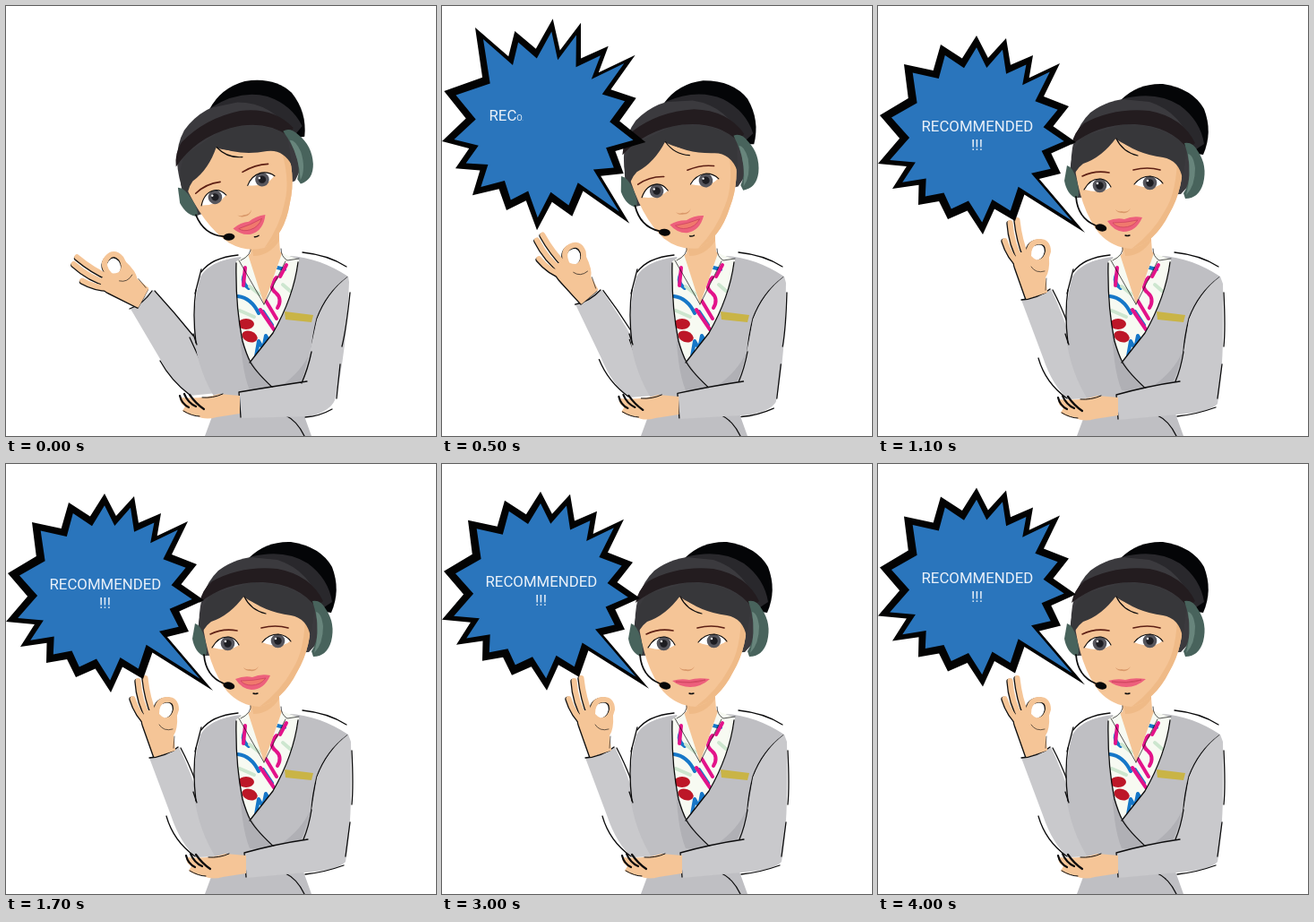
These frames come from a looping animation (480x480 px, 4.1 s). An HTML page:

```html
<!DOCTYPE html>
<html lang="en">
<head>
<meta charset="utf-8">
<title>Recommended</title>
<style>
html, body { margin: 0; width: 100%; height: 100%; overflow: hidden; background: #fff; }
svg { display: block; width: 100vw; height: 100vh; }
text { font-family: Roboto, "Open Sans", sans-serif; font-weight: 400; fill: #eaf1f9; }
.line { fill: none; stroke: #0c0c0d; stroke-width: 1.3; stroke-linecap: round; stroke-linejoin: round; }
.cloth { fill: #bfbfc3; }
.sleeve { fill: #c9c9cc; }
.skin { fill: #f5c597; }
.shade { fill: #b0b0b5; }
.paint { fill: none; stroke-width: 4; stroke-linecap: round; stroke-linejoin: round; }
.brow { fill: none; stroke: #5d1f14; stroke-width: 1.6; stroke-linecap: round; }
</style>
</head>
<body>
<svg viewBox="0 0 480 480">
  <defs>
    <clipPath id="vee"><path d="M259 284L270 278 288 333 308 277 327 283Q322 325 298 365L272 398Q258 360 257 320Z"/></clipPath>
    <g id="fingers" fill="none" stroke-linecap="round" stroke-linejoin="round">
      <path stroke-width="6" d="M160 291Q147 280 141.500 262M161 286Q149 266 147.500 242M166 281Q158 262 155.500 239"/>
      <path stroke-width="6" d="M168 279Q168 264 179 263Q190 262 190 274Q188 284 180 286"/>
      <path stroke-width="2" d="M166 326L154 292Q150 281 159 276L168 276Q172 285 182 285L190 280Q191 296 186 303L188 319Z"/>
    </g>
  </defs>

  <path class="skin" d="M272 250L304 248 306 274 315 284 288 337 263 285 273 276Z"/>
  <path fill="#efba87" d="M274 268Q292 272 305 252L305 262Q294 279 276 279Z"/>

  <path id="sleeve" class="sleeve"/>
  <path id="sleeveLine" class="line"/>
  <path id="cuff" class="line"/>
  <g id="hand">
    <use href="#fingers" x="-1.200" y=".7" stroke="#111"/>
    <g stroke="#f5c597" fill="#f5c597"><use href="#fingers"/></g>
    <path class="skin" d="M166 326L154 292Q150 281 159 276L168 276Q172 285 182 285L190 280Q191 296 186 303L188 319Z"/>
    <path class="line" style="stroke-width:.6" d="M171 291Q176 299 186 296M188 304L187 317"/>
  </g>

  <path class="cloth" d="M262 280Q228 284 217 302Q209 330 210 370Q215 410 236 442L222 480 341 480 332 455Q346 420 346 380L382 302Q350 281 317 279L288 334Z"/>
  <path class="shade" d="M261 352Q266 380 274 396Q284 414 302 432L272 429Q262 405 261 352Z"/>
  <path class="shade" d="M340 386Q335 407 329 420L306 425Q330 408 340 386Z"/>

  <path fill="#f7faf2" d="M257 285L270 277 288 333 308 276 327 283Q322 325 298 365L272 398Q258 360 257 320Z"/>
  <g clip-path="url(#vee)">
    <path class="paint" stroke="#1677c8" d="M259 324Q274 326 282 343M266 300Q262 309 271 315M279 391L282 374 287 383 290 368 295 376M287 341L297 356M303 292L311 294"/>
    <path class="paint" stroke="#e3138a" d="M267 292L265 312M284 339L299 361M290 329L302 349M302 303Q292 313 301 320Q309 327 303 337M313 289L306 302"/>
    <path class="paint" stroke="#cde6cf" d="M261 340L277 347M272 313L283 322M309 311L317 318"/>
    <g fill="#bd1728"><ellipse cx="268" cy="355" rx="9" ry="6"/><ellipse cx="272" cy="369" rx="9" ry="6" transform="rotate(20 272 369)"/></g>
  </g>
  <path class="line" d="M273 268Q275 278 262 284M307 271Q307 280 314 284L327 282M260 284L288 333M312 285L288 333" style="stroke-width:.7"/>
  <path class="line" d="M257 287Q256 335 264 374Q268 388 273 398Q280 410 302 430M326 286Q321 325 298 365L272 398M312 457Q325 463 333 480"/>
  <path class="line" d="M259 278Q229 281 218 297M212 317Q208 343 212 376M331 275Q360 278 380 291M381 303Q357 321 347 349Q342 370 341 386"/>
  <path class="line" d="M218 294L211 321M209 366L213 378"/>
  <path fill="#c9b446" d="M311 341L343 345 341 353 312 350Z"/>
  <path id="arm" class="sleeve"/>
  <path id="armLine" class="line"/>
  <g id="palm">
    <path class="skin" d="M268 437L245 435Q226 441 202 439Q200 445 207 449L204 454Q211 459 219 459Q229 465 242 461L268 457Z"/>
    <path class="line" style="stroke-width:2.2" d="M201 437Q203 446 211 450M206 435Q210 445 219 449M212 436Q219 446 228 452"/>
    <path class="line" style="stroke-width:1" d="M226 439Q238 440 249 435M205 454Q215 460 223 460"/>
  </g>

  <g id="head">
    <path fill="#040507" d="M271 105Q290 86 318 87Q351 92 364 115Q374 141 363 166L336 162Z"/>
    <path fill="#3b3a3e" d="M216 190Q212 143 237 119Q265 98 303 105Q343 115 356 152L352 195 338 210 222 214Z"/>
    <path fill="#29282c" d="M272 104Q310 94 337 111Q360 128 364 154L352 162Q341 119 303 107Z"/>
    <path class="skin" d="M219 174Q236 162 265 148Q288 165 340 167Q342 203 325 232Q309 264 283 271Q262 270 247 254Q225 226 219 174Z"/>
    <path fill="#efba87" d="M340 167Q342 203 325 232Q309 264 283 271Q307 253 320 229Q334 207 334 166Z"/>
    <path fill="#37373a" d="M216 199Q210 166 230 145L275 132Q320 132 345 158L340 193Q336 172 318 169Q287 165 266 147Q250 169 229 176Q218 184 216 199Z"/>
    <path fill="#231c1f" d="M216 155Q219 140 230 131Q263 113 303 117Q340 124 354 153L346 160Q326 134 287 132Q246 131 216 155Z"/>
    <path class="line" style="stroke-width:1.2" d="M266 148Q273 163 290 167"/>
    <g fill="#48635c">
      <path d="M342 153Q351 151 357 162Q368 178 363 198Q358 215 343 215L341 209Q354 190 342 153Z"/>
      <path d="M211 178Q218 180 222 195Q226 210 222 215Q211 211 208 195Z"/>
    </g>
    <path fill="#68857c" d="M346 165Q352 166 354 181Q354 201 344 211Q350 189 346 165Z"/>
    <path class="line" style="stroke-width:1.8" d="M221 213Q223 237 243 245"/>
    <ellipse cx="249" cy="247.500" rx="6.500" ry="4" fill="#080809" transform="rotate(14 249 247)"/>
    <path class="brow" d="M228 190Q242 183 258 186M285 183Q301 179 315 183"/>
    <g id="open">
      <path fill="#fff" d="M231 205Q237 192 249 193Q256 194 260 202Q249 210 231 205ZM286 199Q293 190 304 190Q313 191 317 198Q306 207 286 199Z"/>
      <g fill="#56565d"><circle cx="247.500" cy="200.500" r="7.800"/><circle cx="303.500" cy="197.500" r="7.800"/></g>
      <g fill="#1d1d22"><circle cx="247.500" cy="200.500" r="4.200"/><circle cx="303.500" cy="197.500" r="4.200"/></g>
      <g fill="#fff"><circle cx="245" cy="198" r="1.200"/><circle cx="301" cy="195" r="1.200"/></g>
      <path class="line" style="stroke-width:1.1" d="M230 205Q237 192 249 193Q256 194 260 202M286 199Q293 190 304 190Q313 191 318 198"/>
    </g>
    <path id="shut" class="line" d="M229 203Q243 207 258 203M294 200Q307 200 319 195"/>
    <path fill="#d9986a" d="M265 227Q268 230 272 229Q278 231 282 226Q279 232 273 231Q267 231 265 227Z"/>
    <path id="lips" fill="#ed607c"/>
    <path id="tongue" fill="#f0796d" stroke="#cf4560" stroke-width=".8"/>
    <path class="line" style="stroke-width:1.4" d="M276 256Q278 257 281 256"/>
  </g>

  <g id="burst">
    <path id="rim" fill="#030303"/>
    <path id="core" fill="#2a75bc"/>
  </g>
  <text id="word" font-size="16.800"></text>
  <text id="marks" font-size="16.800"></text>
</svg>
<script>
const $ = id => document.getElementById(id);
const LOOP = 4100, STEP = 100, FONT = 16.8;
const WORD = "RECOMMENDED", MARKS = "!!!";

// value of a piecewise linear track at time t
function track(t, keys) {
  if (t <= keys[0][0]) return keys[0][1];
  for (let i = 1; i < keys.length; i++) {
    const [a, u] = keys[i - 1], [b, v] = keys[i];
    if (t <= b) return u + (v - u) * (t - a) / (b - a);
  }
  return keys[keys.length - 1][1];
}

// blend two paths with the same commands
function blend(from, to, p) {
  const ends = to.match(/[\d.]+/g);
  let i = 0;
  return from.replace(/[\d.]+/g, n => (+n + (ends[i++] - n) * p).toFixed(2));
}

const POSES = {
  sleeve: ["M164 317Q190 345 214 374L236 432 205 435Q185 420 172 394L139 338Z",
           "M193 316Q207 345 216 376L236 438 213 439Q195 425 184 392L160 328Z"],
  sleeveLine: ["M166 318Q188 342 209 368M172 396Q184 418 205 434M205 370Q219 400 233 431",
               "M195 317Q204 334 212 355M179 393Q187 421 211 438M214 375Q222 410 237 437"],
  cuff: ["M138 338Q153 333 163 318", "M160 328Q178 327 192 316"],
  arm: ["M382 302Q360 318 347 350Q340 385 330 421L260 431 262 460 340 458Q362 452 367 440Q380 390 383 308Z",
        "M382 302Q360 318 347 350Q342 390 332 419L266 434 268 462 345 455Q372 452 379 444Q387 400 385 310Z"],
  armLine: ["M336 419Q302 424 260 431L262 459M384 320Q380 360 375 380M373 400L369 438M334 459Q350 458 364 450M341 386Q337 405 330 421",
            "M337 419Q302 424 266 434L268 461M386 320Q388 360 386 380M384 400L379 438M334 458Q355 456 377 448M341 386Q338 405 332 419"]
};
const LIPS = ["M256 240Q266 236 275 238Q284 234 295 236Q288 252 274 252Q263 251 256 240Z",
              "M257 242Q267 239 276 241Q285 238 299 240Q289 249 277 249Q266 249 257 242Z"];
const TONGUE = ["M262 242Q276 242 290 239Q284 247 274 247Q266 247 262 242Z",
                "M261 243Q277 245 294 241Q286 244 277 244Q268 244 261 243Z"];

// spike tips of the burst, clockwise from the top: popped up, swollen, at rest
const POPPED = "125,31 155,38 187,66 213,90 212,128 222,170 202,205 170,226 140,240 98,261 62,236 28,218 5,192 0,155 7,103 37,54 84,40";
const SWOLLEN = "123,12 155,15 185,40 217,43 219,96 230,149 203,184 229,257 148,238 110,251 77,230 37,214 20,182 0,155 0,97 37,15 80,28";
const REST = "110,33 143,36 173,55 203,64 213,112 221,152 204,187 231,253 153,240 117,255 78,238 45,222 16,204 0,176 2,122 29,65 70,43";

// star through the tips; inset pulls them in, notch is the inner radius
function star(tips, [cx, cy], inset, notch) {
  const pts = tips.map(([x, y], i) => {
    const [nx, ny] = tips[(i + 1) % tips.length];
    const a = Math.atan2((y + ny) / 2 - cy, (x + nx) / 2 - cx);
    return [cx + (x - cx) * inset, cy + (y - cy) * inset,
            cx + Math.cos(a) * notch, cy + Math.sin(a) * notch].map(n => n.toFixed(1)).join(" ");
  });
  return "M" + pts.join("L") + "Z";
}

function letters(el, str, first) {
  return [...str].map((c, i) => {
    const s = document.createElementNS("http://www.w3.org/2000/svg", "tspan");
    s.textContent = c;
    el.appendChild(s);
    return { s, start: 335 + 40 * (first + i) };
  });
}
const glyphs = letters($("word"), WORD, 0).concat(letters($("marks"), MARKS, WORD.length));

function show(id, on) { $(id).style.display = on ? "" : "none"; }

function drawBurst(t, rise) {
  show("burst", t >= 100);
  const swell = track(t, [[300, 0], [600, 1]]);
  const settle = track(t, [[700, 0], [1100, 1]]);
  const shape = blend(blend(POPPED, SWOLLEN, swell), REST, settle);
  const tips = shape.split(" ").map(s => s.split(",").map(Number));
  const center = [track(t, [[300, 109], [600, 114], [700, 114], [1100, 110]]),
                  track(t, [[300, 146], [600, 133], [700, 133], [1100, 143]])];
  $("rim").setAttribute("d", star(tips, center, 1, 86));
  $("core").setAttribute("d", star(tips, center, .88, 75));
  const size = track(t, [[0, 0], [100, .35], [200, .8], [300, 1]]);
  const lift = rise + track(t, [[400, 0], [600, -8], [700, 0]]);
  $("burst").setAttribute("transform",
    `translate(${center[0]} ${center[1] + lift}) scale(${size}) translate(${-center[0]} ${-center[1]})`);
}

function drawText(t, rise) {
  const dx = track(t, [[700, 4], [1100, 0]]);
  const dy = rise + track(t, [[400, -6], [600, -18], [700, -12.5], [1100, 0]]);
  $("word").setAttribute("x", 48.5 + dx);
  $("word").setAttribute("y", 139.5 + dy);
  $("marks").setAttribute("x", 104 + dx);
  $("marks").setAttribute("y", 160.5 + dy);
  for (const { s, start } of glyphs) {
    const k = track(t, [[start, 0], [start + 80, 1]]);
    s.style.display = k ? "" : "none";
    s.setAttribute("font-size", (FONT * k).toFixed(2));
  }
}

function draw(t) {
  const p = track(t, [[0, 0], [200, .02], [300, .08], [400, .24], [500, .48], [600, .72], [700, .89], [800, .97], [900, 1]]);
  const back = 1 - p;
  for (const id in POSES) $(id).setAttribute("d", blend(...POSES[id], p));
  $("hand").setAttribute("transform", `translate(${-25 * back} ${4 * back}) rotate(${-44 * back} 176 321)`);
  $("palm").setAttribute("transform", `translate(${-7 * back} ${-2 * back})`);
  $("head").setAttribute("transform", `rotate(${-17.5 * back} 277 240) translate(${-4 * back} ${back})`);

  const shut = (t >= 2400 && t < 2700) || (t >= 3400 && t < 3700);
  show("open", !shut);
  show("shut", shut);
  const calm = track(t, [[2700, 0], [3000, 1]]);
  $("lips").setAttribute("d", blend(...LIPS, calm));
  $("tongue").setAttribute("d", blend(...TONGUE, calm));

  const rise = track(t, [[2500, 0], [3500, -4.5], [4000, -6.5]]);
  drawBurst(t, rise);
  drawText(t, rise);
}

const begin = performance.now();
function tick() {
  const t = (performance.now() - begin) % LOOP;
  draw(Math.floor(t / STEP) * STEP);
  requestAnimationFrame(tick);
}
tick();
</script>
</body>
</html>
```
